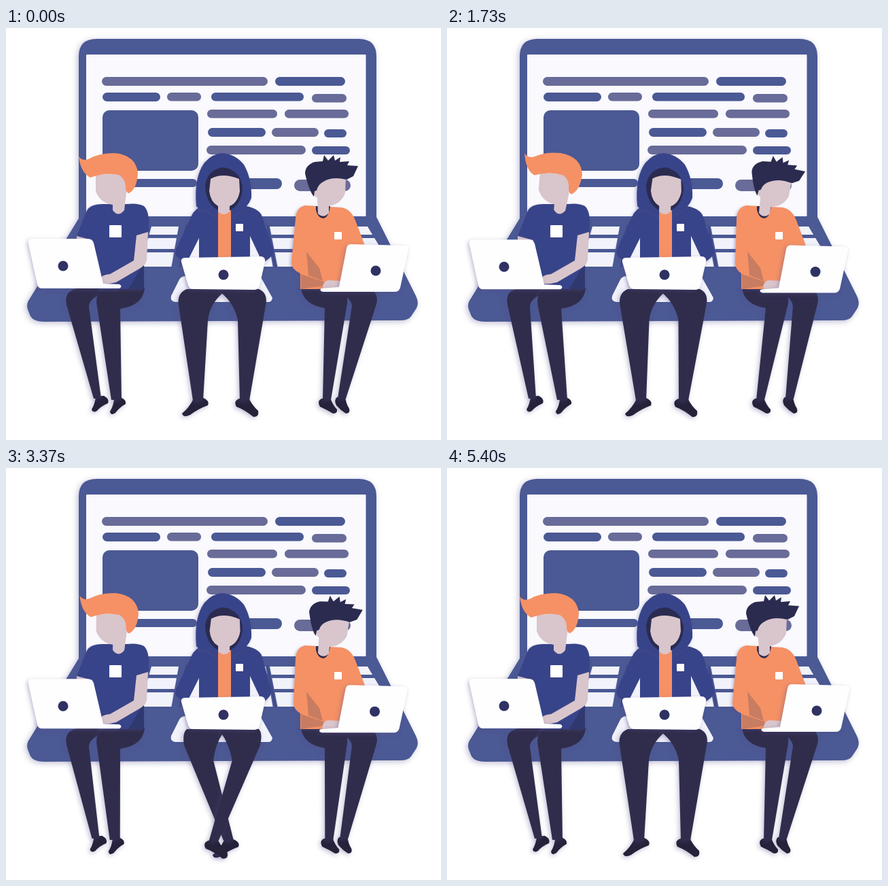
Write an HTML page with a canvas that moves like this. It is 640 px wide and 606 px high and loops after 5460 ms.

```html
<!DOCTYPE html>
<html lang="en">
<head>
<meta charset="utf-8">
<title>Three people with laptops</title>
<style>
html, body { margin: 0; width: 100%; height: 100%; overflow: hidden; background: #fff; }
canvas { display: block; }
</style>
</head>
<body>
<canvas id="stage" width="640" height="606"></canvas>
<script>
const ctx = document.getElementById('stage').getContext('2d');
const LOOP = 5460;
const C = {
  blue: '#4b5994', grey: '#696b98', screen: '#f9f9fe', key: '#f1f2fa', navy: '#384489', deep: '#2b2b50',
  pants: '#302d4c', shoe: '#25223a', skin: '#d9c5cc', orange: '#f59165', fold: '#c87c62', dot: '#2f3263'
};

// Key poses: head tilts in degrees, ankle shifts in pixels
const times = [0, 870, 1730, 2870, 3870, 4670, 5400];
const tracks = {
  headL: [0, 2.6, 5, 2.6, 0, 0, 0],
  headM: [0, 1, 1.5, 1, 1, .7, 0],
  headR: [0, 5, 8, 6.5, 5, 0, 0],
  l1: [0, -8, -9, -5, 0, 3, 0],
  l2: [0, 8, 7, -3, -1, 1, 0],
  m1: [0, 2, 3, 45, 45, 42, 0],
  m2: [0, -3, -3, -47, -42, -36, 0],
  r1: [0, -6, -11, 0, 5, 3, 0],
  r2: [0, 4, 10, 9, -2, -2, 0]
};

// Smooth interpolation that never overshoots a key pose
function sample(v, t) {
  const last = times.length - 1;
  if (t >= times[last]) return v[last];
  const i = times.findIndex((x, n) => t < times[n + 1]);
  const rise = n => (v[n + 1] - v[n]) / (times[n + 1] - times[n]);
  const slope = n => {
    if (n === 0 || n === last) return 0;
    const a = rise(n - 1), b = rise(n);
    return a * b > 0 ? 2 * a * b / (a + b) : 0;
  };
  const h = times[i + 1] - times[i], u = (t - times[i]) / h, w = 1 - u;
  return v[i] * (1 + 2 * u) * w * w + v[i + 1] * u * u * (3 - 2 * u)
    + h * (slope(i) * u * w * w - slope(i + 1) * u * u * w);
}

function fill(d, color) {
  ctx.fillStyle = color;
  ctx.fill(new Path2D(d));
}

function bar(x0, y0, x1, y1, color, r = (y1 - y0) / 2) {
  ctx.fillStyle = color;
  ctx.beginPath();
  ctx.roundRect(x0, y0, x1 - x0, y1 - y0, r);
  ctx.fill();
}

function dot(x, y) {
  ctx.fillStyle = C.dot;
  ctx.beginPath();
  ctx.arc(x, y, 7.5, 0, 7);
  ctx.fill();
}

function shaded(blur, draw) {
  ctx.save();
  ctx.shadowColor = 'rgba(85,80,140,.38)';
  ctx.shadowBlur = blur;
  ctx.shadowOffsetX = -2;
  ctx.shadowOffsetY = 2;
  draw();
  ctx.restore();
}

function shifted(x, y, draw) {
  ctx.save();
  ctx.translate(x, y);
  draw();
  ctx.restore();
}

function tilted(x, y, degrees, draw) {
  ctx.save();
  ctx.translate(x, y);
  ctx.rotate(degrees * Math.PI / 180);
  ctx.translate(-x, -y);
  draw();
  ctx.restore();
}

function leg(d, shoe, dx, dy = 0) {
  shaded(7, () => {
    shifted(dx, dy, () => fill(shoe, C.shoe));
    fill(d, C.pants);
  });
}

function keyboard() {
  const px = (u, y) => 318 + (u - 318) * (1 + (y - 292) * .0028);
  const quad = (a, b, y0, y1, color) =>
    fill(`M${px(a, y0)} ${y0}H${px(b, y0)}L${px(b, y1)} ${y1}H${px(a, y1)}Z`, color);
  for (const [y0, y1] of [[292, 304], [309, 325], [330, 351]])
    for (const [a, b] of [[214, 254], [362, 382], [388, 428], [434, 474], [480, 532]])
      quad(a, b, y0, y1, C.key);
  quad(264, 266, 290, 352, '#3d4985');
  quad(384, 386, 290, 352, '#3d4985');
  fill('M264 365H374L392 397Q391 403 386 403H249Q241 402 243 394L255 370Q258 365 264 365Z', C.key);
}

function bigLaptop() {
  shaded(9, () => fill('M107 280V42Q107 16 133 16H519Q545 16 545 42V278L603 394Q608 404 604 412L596 424Q592 430 580 430L56 432Q41 432 36 424L32 414Q29 406 35 398Z', C.blue));
  bar(118, 39, 529.5, 277, C.screen, 1);
  bar(142, 121, 283, 210, C.blue, 10);
  for (const b of [[396, 72, 499, 85], [142, 95, 227, 108], [302, 95, 438, 107.5], [297, 147, 382, 160],
    [468, 149, 501, 161], [450, 174, 506, 186], [150, 222, 281, 234], [340, 221, 406, 237]]) bar(...b, C.blue);
  for (const b of [[141, 72, 385, 85], [237, 95, 287, 107.5], [450, 97, 501, 109.5], [296, 120, 399, 132.5],
    [410, 120, 504, 132.5], [391, 147, 460, 160], [295, 173, 441, 186], [424, 223, 507, 240]]) bar(...b, C.grey);
  keyboard();
}

function leftPerson(p) {
  const a = p.l1, b = p.l2;
  leg(`M140 383H106Q85 386 89 407L${129 + a} 545H${140 + a}L122 410Q122 398 142 391Z`,
    'M132 542L144 541Q153 546 150 552Q140 556 134 563Q128 567 126 561Q131 553 132 542Z', a);
  leg(`M204 382H145Q130 390 134 410L${155 + b} 547H${170 + b}L168 413Q202 408 204 382Z`,
    'M159 546L170 544Q177 547 176 553Q167 558 161 566Q154 571 153 564Q158 556 159 546Z', b);
  shaded(4, () => fill('M142 259Q122 259 118 271L104 306L128 315L138 384H203V306L210 299Q212 270 203 262Q194 257 178 259Z', C.navy));
  fill('M104 306L127 312V318H104Z', C.skin);
  fill('M203 306L203 384H180L200 350Z', '#2f3970');
  bar(152, 290, 170, 308, '#fff', 1);
  fill('M192 305L209 300L207 341Q206 348 198 353L162 374Q142 379 137 374Q137 363 153 362L188 342Z', C.skin);
  tilted(165, 270, p.headL, () => {
    fill('M132 216V240Q138 257 157 260V268Q165 279 174 268L177 243V214Z', C.skin);
    fill('M107 189Q113 197 123 192Q137 184 160 184Q191 187 194 213Q193 236 181 243Q177 243 176 236Q177 223 166 216Q145 212 124 220Q110 213 107 189Z', C.orange);
  });
  shifted(0, p.headL * .25, () => {
    shaded(6, () => fill('M37 310L120 310Q127 310 129 316L143 376L167 377Q172 380 167 383L53 383Q47 383 46 377L33 317Q32 311 37 310Z', '#fefefe'));
    dot(84, 350);
  });
}

function middlePerson(p) {
  const a = p.m1, b = p.m2, j = a * .18, k = b * .18;
  leg(`M320 384H266Q${251 + j} 390 ${254 + j} 408L${275 + a} 548H${290 + a}L${297 + j} 430Q${300 + j} 405 320 389Z`,
    'M276 545L290 544Q300 548 297 555Q283 560 271 569Q261 574 259 567Q270 558 276 545Z', a, a * .05);
  leg(`M316 384H372Q${386 + k} 390 ${382 + k} 408L${358 + b} 548H${344 + b}L${341 + k} 430Q${336 + k} 405 316 389Z`,
    'M344 545L357 544Q362 555 371 563Q373 572 364 572Q352 562 339 557Q334 548 344 545Z', b, -b * .06);
  const elbow = 394 - a * .07;
  shaded(5, () => {
    fill(`M292 261Q277 265 272 278L250 326Q246 337 262 342L270 352V380H370L378 345Q${elbow} 336 ${elbow} 328L376 275Q370 264 348 261Z`, C.navy);
    fill('M280 262Q276 220 292 198Q305 184 319 184Q338 186 350 201Q362 222 361 250Q356 264 342 271L320 282L298 269Q284 268 280 262Z', C.navy);
  });
  fill('M284 309V339H269Z', C.key);
  fill('M359 306L374 338H359Z', C.key);
  fill('M312 268H331V342H312Z', C.orange);
  fill('M293 232Q296 208 320 205Q345 209 348 235Q347 258 330 268H312Q294 258 293 232Z', C.deep);
  tilted(320, 272, p.headM, () =>
    fill('M301 222Q318 212 343 222L344 240Q341 257 329 262V270Q320 278 312 270V262Q301 256 299 240Z', C.skin));
  bar(338, 288, 349, 299, '#fff', 1);
  shaded(5, () => fill('M262 338L376 336Q382 337 381 344L373 379Q371 385 365 385L276 384Q270 384 268 379L258 344Q257 339 262 338Z', '#fefefe'));
  dot(320, 363);
}

function rightPerson(p) {
  const a = p.r1, b = p.r2, sway = p.headR * .5;
  leg(`M490 383H535Q549 390 545 406L${500 + b} 545H${488 + b}L509 409Q508 398 495 392Z`,
    'M487 543L499 542Q500 552 505 560Q507 567 500 567Q492 562 486 555Q482 547 487 543Z', b);
  leg(`M434 382H490Q504 388 502 405L${478 + a} 547H${466 + a}L469 412Q437 407 434 382Z`,
    'M465 545L477 544Q481 555 487 561Q488 567 481 567Q473 562 462 557Q457 548 465 545Z', a);
  shaded(4, () => fill(`M440 261Q427 264 426 280L${420 + sway} 345Q${420 + sway} 355 433 361V384H490L503 320H528L514 283Q508 267 494 264Z`, C.orange));
  fill('M442 329L461 353L466 372L445 364Z', C.fold);
  fill('M434 362L470 374L468 379L434 384Z', C.fold);
  bar(483, 300, 494, 311, '#fff', 1);
  fill('M456 262V268Q459 280 467 280Q475 278 477 262Z', C.deep);
  shifted(-p.headR * .1, 0, () => fill('M466 384Q465 373 474 371L492 372V384Z', C.skin));
  tilted(466, 272, p.headR, () => {
    fill('M457 229Q470 215 500 220L499 243Q493 259 475 262V272Q467 281 459 273L458 250Q450 245 454 240Z', C.skin);
    fill('M453 248Q446 240 440 214Q440 202 454 197L466 196L468 187L474 195L482 187L484 195L492 190L491 197L505 196L502 202L518 203L511 218L501 223Q480 218 467 226Q459 230 457 239L454 240Z', C.deep);
  });
  shifted(-p.headR * .25, p.headR * .2, () => {
    shaded(6, () => fill('M507 318L587 320Q593 321 592 327L580 382Q578 388 572 388H466Q460 386 464 383L490 381L501 324Q502 318 507 318Z', '#fefefe'));
    dot(544, 357);
  });
}

function frame(now) {
  const t = now % LOOP, pose = {};
  for (const name in tracks) pose[name] = sample(tracks[name], t);
  ctx.fillStyle = '#fff';
  ctx.fillRect(0, 0, 640, 606);
  bigLaptop();
  leftPerson(pose);
  middlePerson(pose);
  rightPerson(pose);
  requestAnimationFrame(frame);
}
frame(performance.now());
</script>
</body>
</html>
```
